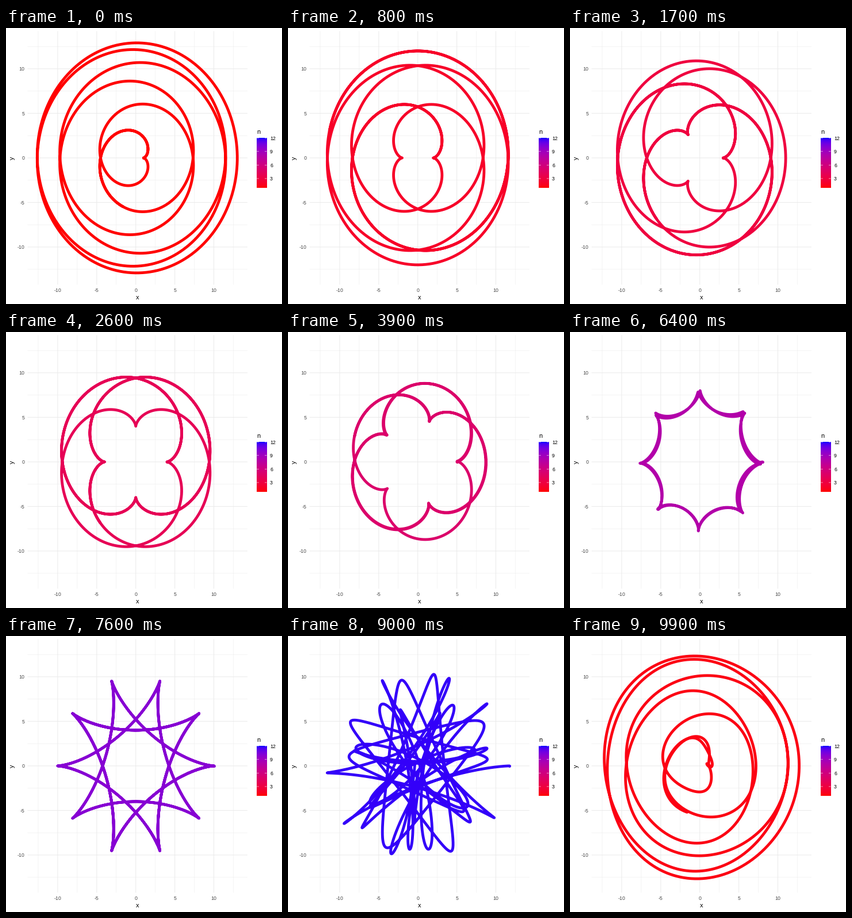
A matplotlib script for the animation above (10000 ms loop, 480 px wide and 480 px high).

```python
import numpy as np
import matplotlib.pyplot as plt
from matplotlib.animation import FuncAnimation

SIZE, DPI = 480, 96
FRAMES, STEP = 100, 100
STATES = 12
PT = 72 / DPI                       # points per pixel
X0, Y0, SX, SY = 225.7, 225.9, 13.58, 15.5
LEFT, RIGHT, TOP, BOTTOM = 37.5, 419.8, 5.5, 446.3
WIDTH = 4.8

plt.rcParams["font.family"] = "Liberation Sans"

# (first frame, length) of every morph between neighbouring states
MORPHS = [(2 + 9 * k, 6) for k in range(5)] + [(47 + 8 * k, 5) for k in range(7)]


def curve(n, samples=5000):
    """Epicycloid (n < 7) or hypocycloid (n > 7) with fixed radius n."""
    r = 7 - n
    a = np.linspace(0, 2 * np.pi * (n + 7), samples)
    return np.array([7 * np.cos(a * r / 7) - r * np.cos(a),
                     7 * np.sin(a * r / 7) - r * np.sin(a)])


def lab_to_rgb(lab):
    light, a, b = lab
    fy = (light + 16) / 116
    f = np.array([fy + a / 500, fy, fy - b / 200])
    xyz = np.where(f > 6 / 29, f ** 3, 3 * (6 / 29) ** 2 * (f - 4 / 29))
    xyz = xyz * [0.95047, 1, 1.08883]
    lin = np.array([[3.2406, -1.5372, -0.4986],
                    [-0.9689, 1.8758, 0.0415],
                    [0.0557, -0.2040, 1.0570]]) @ xyz
    lin = np.clip(lin, 0, 1)
    return np.where(lin > 0.0031308, 1.055 * lin ** (1 / 2.4) - 0.055, 12.92 * lin)


def shade(n):
    red = np.array([53.24, 80.09, 67.20])
    blue = np.array([32.30, 79.19, -107.86])
    return np.clip(lab_to_rgb(red + (blue - red) * (n - 1) / (STATES - 1)), 0, 1)


def ease(p):
    return 4 * p ** 3 if p < 0.5 else 1 - 4 * (1 - p) ** 3


def px(v):
    return X0 + SX * v


def py(v):
    return Y0 - SY * v


fig = plt.figure(figsize=(SIZE / DPI, SIZE / DPI), dpi=DPI, facecolor="white")
ax = fig.add_axes([0, 0, 1, 1])
ax.axis("off")


def rule(xs, ys, width, color, z=1):
    ax.plot(xs, ys, color=color, lw=width * PT, solid_capstyle="butt",
            snap=False, zorder=z)


def label(x, y, text, size, color="black", ha="center", **kw):
    ax.text(x, y, text, fontsize=size * PT, color=color, ha=ha,
            va=kw.pop("va", "baseline"), **kw)


def draw_axes():
    for minor in (True, False):
        values = np.arange(-12.5, 13, 5) if minor else np.arange(-10, 11, 5)
        width = 0.53 if minor else 1.07
        for v in values:
            rule([px(v)] * 2, [TOP, BOTTOM], width, "#ebebeb")
            rule([LEFT, RIGHT], [py(v)] * 2, width, "#ebebeb")
    for v in range(-10, 11, 5):
        label(px(v), 459, str(v), 8.8, "#4d4d4d")
        label(32.3, py(v) + 3.2, str(v), 8.8, "#4d4d4d", ha="right")
    label((LEFT + RIGHT) / 2, 472, "x", 11)
    label(11, Y0, "y", 11, va="center", rotation=90)


def draw_legend():
    x0, x1, y0, y1 = 436.2, 453.5, 191.2, 277.6
    ramp = np.array([[shade(n)] for n in np.linspace(STATES, 1, 200)])
    ax.imshow(ramp, extent=(x0, x1, y1, y0), aspect="auto", zorder=2,
              interpolation="bilinear")
    label(436, 184.5, "n", 11, ha="left")
    for n in (3, 6, 9, 12):
        y = y0 + (STATES - n) * (y1 - y0) / (STATES - 1)
        for a, b in ((x0, x0 + 3.46), (x1 - 3.46, x1)):
            rule([a, b], [y, y], 0.6, "white", 3)
        label(459, y + 3.4, str(n), 8.8, ha="left")


draw_axes()
draw_legend()
ax.set_xlim(0, SIZE)
ax.set_ylim(SIZE, 0)

CURVES = [curve(n) for n in range(1, STATES + 1)]
path, = ax.plot([], [], lw=WIDTH * PT, solid_capstyle="round",
                solid_joinstyle="round", zorder=5)
dot, = ax.plot([], [], "o", ms=WIDTH * PT, mew=0, zorder=5)


def update(i):
    k, p = 0, 0.0
    for j, (start, length) in enumerate(MORPHS):
        if i >= start:
            k, p = j, min(1, (i - start) / length)
    nxt = (k + 1) % STATES
    f = ease(p)
    x, y = CURVES[k] * (1 - f) + CURVES[nxt] * f
    color = shade((k + 1) * (1 - f) + (nxt + 1) * f)
    path.set_data(px(x), py(y))
    dot.set_data([px(x[0])], [py(y[0])])
    path.set_color(color)
    dot.set_color(color)
    return path, dot


anim = FuncAnimation(fig, update, frames=FRAMES, interval=STEP,
                     init_func=lambda: update(0), repeat=True, repeat_delay=0)
plt.show()
```
